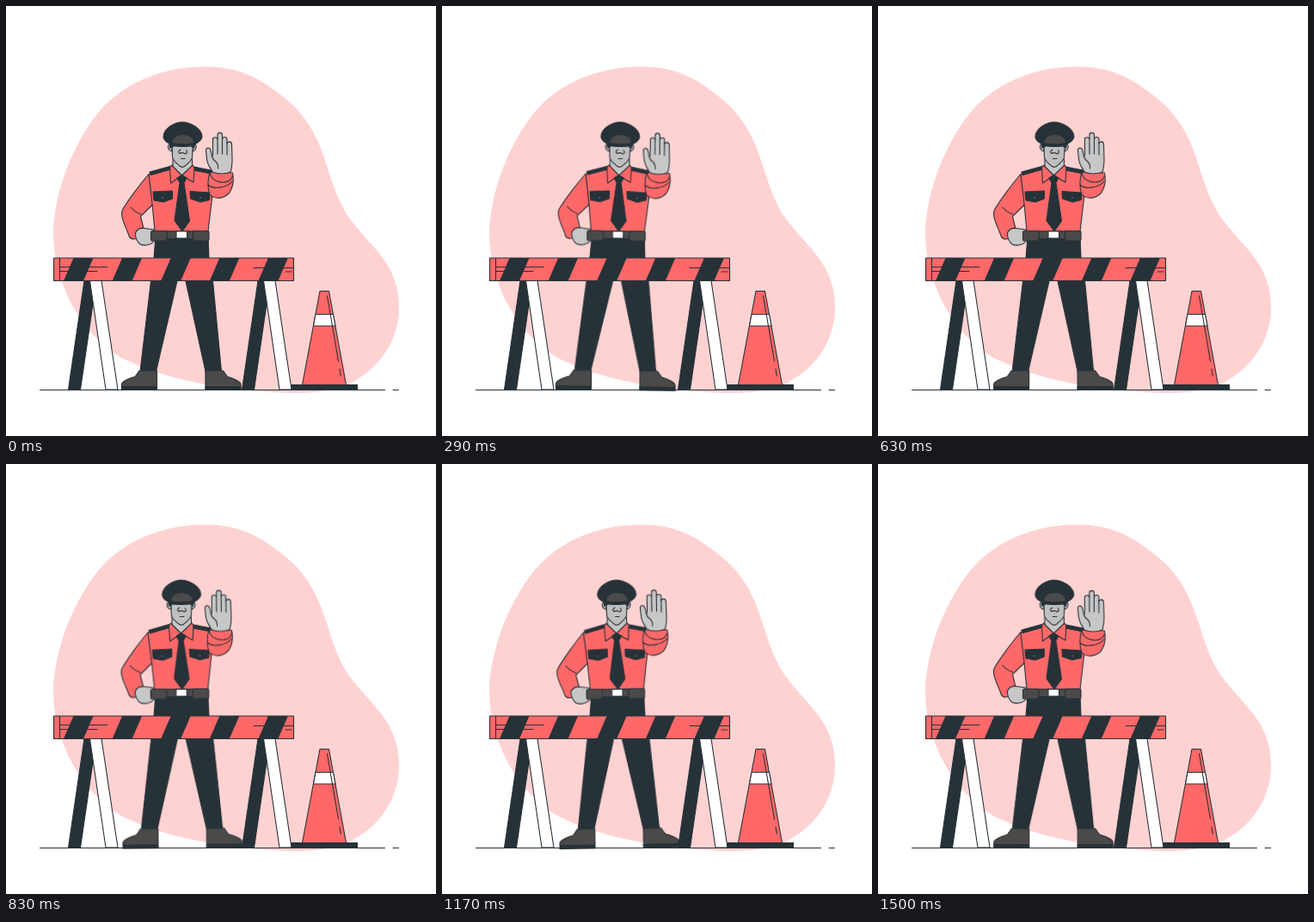
These frames come from a looping animation (500x500 px, 1.54 s). An HTML page:

```html
<!DOCTYPE html>
<html lang="en">
<head>
<meta charset="utf-8">
<title>Roadblock</title>
<style>
  html, body { margin: 0; width: 100%; height: 100%; overflow: hidden; background: #fff; }
  svg { display: block; width: 100%; height: 100%; }
  .line { stroke: #263238; stroke-width: 1.1; stroke-linecap: round; stroke-linejoin: round; }
  .red { fill: #ff6868; }
  .dark { fill: #263238; }
  .grey { fill: #4a4a4a; }
  .skin { fill: #c7c7c7; }
  .face { fill: #bfbfbf; }
  .white { fill: #fff; }
  .none { fill: none; }
  .officer {
    transform-origin: 203.5px 291px;
    animation: sway 1540ms -80ms linear infinite;
  }
  @keyframes sway {
    0%, 100% { transform: rotate(-0.2deg); }
    25% { transform: rotate(0.8deg); }
    75% { transform: rotate(-1.2deg); }
  }
</style>
</head>
<body>
<svg viewBox="0 0 500 500">
  <defs>
    <g id="trestle" class="line">
      <path class="dark" d="M91 319.5H105L86.5 446H72.5Z"/>
      <path class="white" d="M97.5 319.5H111L130 446H116Z"/>
    </g>
    <path id="stripe" class="dark" d="M67 319.5L78.5 293H101.500L90 319.5Z"/>
    <g id="shoe" class="line">
      <path class="grey" d="M155 424H175.5V446.5H134.5V440C135 436 143 433.5 150 431Q152.5 428 155 424Z"/>
      <path class="dark" d="M134.5 442.5H175.5V446.5H134.5Z"/>
    </g>
  </defs>

  <path fill="#ffd2d2" d="M232 70.5C276 70.5 302 88 330 112C377 154 370 208 402 250C424 280 457 300 457 350
    C457 393 430 426 395 441C371 450 345 451 318 449.5C250 446 183 434 134 409C90 383 55 325 55 264
    C56 220 74 170 101 132C129 93 176 70.5 232 70.5Z"/>
  <path class="line none" d="M39.5 446.5H440.5M450 446.5H456.5"/>

  <g class="officer line">
    <!-- legs -->
    <path class="dark" d="M174 269H235L236 293L240.5 320L250.5 425H232L209 320L204 304L199 320L174.5 425H156L168.5 320L172 293Z"/>
    <use href="#shoe"/>
    <use href="#shoe" transform="matrix(-1 0 0 1 407.5 0)"/>

    <!-- bent arm -->
    <path class="red" d="M166 195.5C156 207 141 227 135.5 237C132 244 139 256 143 267Q144 271 149 271L159.5 269L160 259L156.5 244.5L171 230.5Z"/>
    <path class="none" d="M145 234Q149 239 156.5 242"/>
    <path class="skin" d="M150.5 264C152 260 156 258 161 258.5L172 260V274C168 278.5 160 279 156 277C152 274 150 268 150.5 264Z"/>

    <!-- torso -->
    <path class="red" d="M166 195.5L192 187H218L239 193.5L239.5 224L235 262H173L170 230Z"/>
    <path class="dark" d="M167 193L190.5 186.5L191.5 190L168.5 196.5ZM218.5 187L238.5 191V195L218.5 191Z"/>
    <path class="skin" d="M194 178H216.5V189L205 198L194 189Z"/>
    <path class="red" d="M192.5 185L204.5 197L191.5 206L190.5 188ZM217 185L204.5 197L218 205L219 188Z"/>
    <path class="dark" d="M204.5 196.5L210 200L207 205.5L213.5 250L205 262L196 249.5L202 205.5L199 200Z"/>
    <path class="dark" d="M171 216L193.5 215V224L183 228L172 226ZM214 215.5L237 217L236.5 225.5L226 228L214.5 224Z"/>
    <path stroke="#c7c7c7" d="M182 223h.1M226 223h.1"/>

    <!-- belt -->
    <path class="grey" d="M173 262H235V270.5H173Z"/>
    <path class="white" d="M198 262H210.5V270H198Z"/>
    <rect class="grey" x="168.5" y="261.5" width="18.5" height="11.5" rx="2"/>
    <rect class="grey" x="217.5" y="261.5" width="18.5" height="11.5" rx="2"/>

    <!-- raised arm -->
    <path class="red" d="M237 193C234.5 201 234 212 237 219C243 226 257 224 261.5 214C264 209 265 202 263.5 194Z"/>
    <path class="none" d="M237.5 194C238 207 262 209 263.5 197M235 208C242 214 257 211 263 204"/>
    <path class="skin" d="M240 193C237 187 234 184 233.5 178L232.5 168C232.5 164 237 164 238 168L239.5 175L240.5 173V155C240.5 152 245.5 152 246 155
      V150C246 146.5 251.5 146.5 251.5 150V155C252 151.5 257 152 257 155V160C257.5 157 262.5 157 262.5 161
      L263 178Q263 187 261 193C255 196 245 195.5 240 193Z"/>
    <path class="none" d="M246 155V172M251.5 154V172M257 159V173M239.5 175Q240.5 179 244 181Q247 184 246.5 189"/>

    <!-- head -->
    <path class="face" d="M193 161C187 158 187 168 193 169ZM217 161C223 158 222 168 217 169Z"/>
    <path class="face" d="M193 158H217.5L216.5 176C216 180 211 183.5 207.5 186.5Q205 188 202.5 186.5C199 183.5 194 180 193.5 176Z"/>
    <path class="dark" stroke="none" d="M189 156H221L219 166L215 163.5H195L190.500 166Z"/>
    <path class="none" d="M203 167Q199 169.5 202 171.5Q205.5 169.5 208.5 172Q212 170.5 209.5 167.5M203.5 177.5H208"/>
    <path class="dark" d="M183 151.5C184 142 196 135 205 135C214 135 227 142 228 151.5C228 156 223 159 219 161Q206 166 192 161C187 159 183 156 183 151.5Z"/>
    <path class="grey" d="M193 159.5C192.5 153 198 149.5 205.5 149.5C213 149.5 219 153 218.5 159.5Q206 162 193 159.5Z"/>
  </g>

  <!-- barrier -->
  <use href="#trestle"/>
  <use href="#trestle" x="202"/>
  <path class="red" d="M55.5 293H334.5V319.5H55.5Z"/>
  <use href="#stripe"/>
  <use href="#stripe" x="56.6"/>
  <use href="#stripe" x="113.2"/>
  <use href="#stripe" x="169.8"/>
  <use href="#stripe" x="226.4"/>
  <path class="line none" d="M55.5 293H334.5V319.5H55.5ZM62.5 293V319.5M62.5 303.5H118M62.5 308.500H106M288 304.5H334M325 309H332"/>

  <!-- cone -->
  <g class="line">
    <path class="dark" d="M332 440.5H408.5V446H332Z"/>
    <path class="red" d="M365 331.5H375.5L395.5 440.5H344.5Z"/>
    <path class="white" d="M360 358.5H380.5L383 372H357.5Z"/>
    <path class="none" d="M373.5 337L386.5 413M388 422L389.3 430"/>
  </g>
</svg>
</body>
</html>
```
